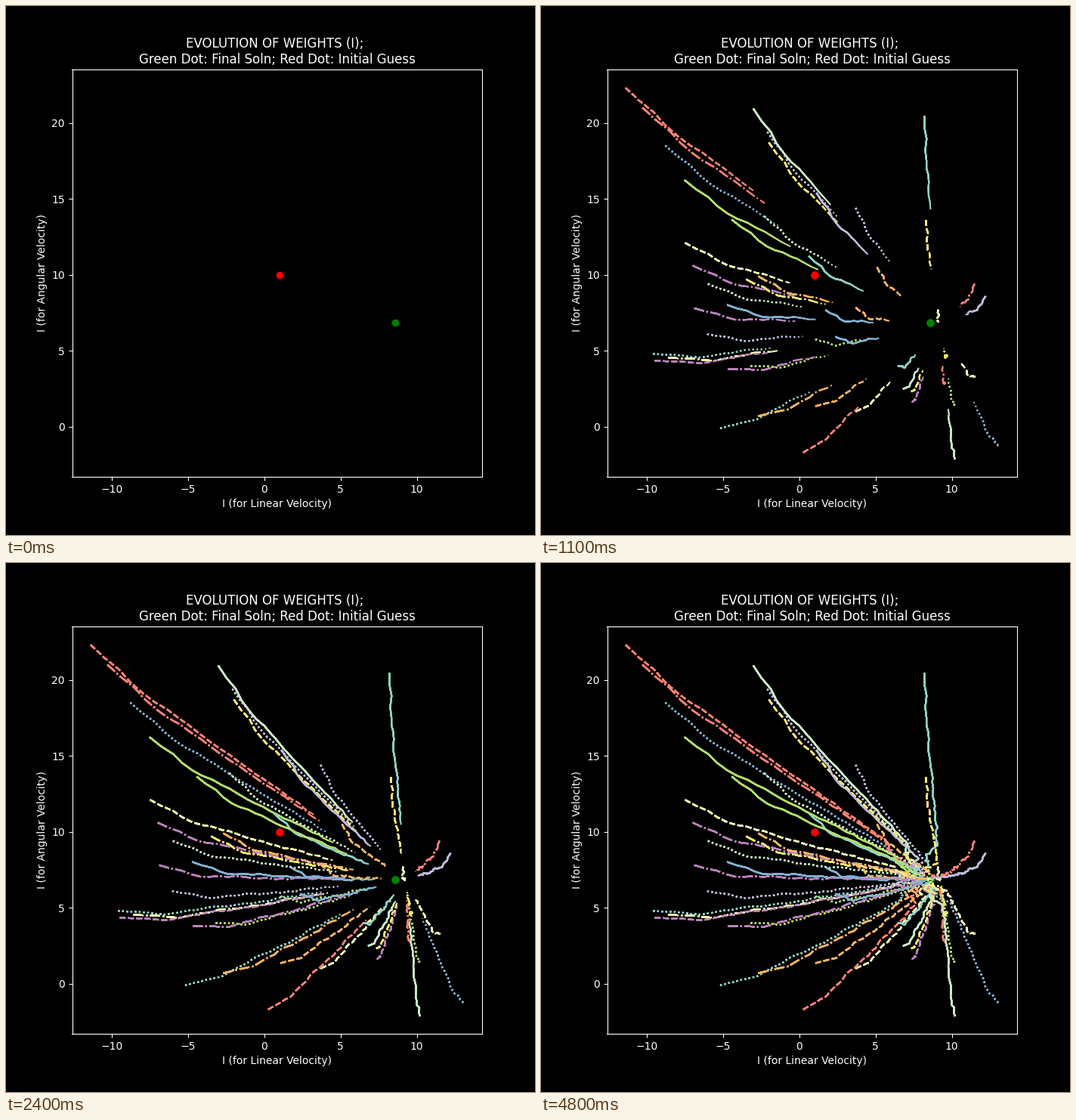
Recreate the animation shown at these times as a matplotlib script. Size 700x700 px, loop 4900 ms.

```python
import numpy as np
import matplotlib.pyplot as plt
from matplotlib.animation import FuncAnimation

FRAMES = 49
LAYERS = 10          # each step is drawn over the previous ones
GOAL = np.array([8.59, 6.84])
GUESS = np.array([1, 10])
STYLES = ("-", "--", ":", "-.")

# Initial weights, one row per round of the ten-colour cycle
STARTS = np.reshape([
    8.2, 20.4, -7.5, 12.1, -2.1, 19.4, -10.3, 21, -4.7, 8,
    5.1, 10.5, -3.2, 4, -7, 10.6, -3, 20.9, -2, 18.7,
    -9.6, 4.8, -8.6, 4.55, 1.15, 15.35, -11.4, 22.3, -8.8, 18.5,
    -2.7, 9.9, -7.5, 16.2, -9.5, 4.35, -2.3, 13.85, -3.5, 9.7,
    0.65, 11.2, 3.7, 1, 3.7, 14.4, 9.55, 2.8, 1.75, 7.65,
    3.7, 7.85, 1.05, 5.75, -6.9, 7.8, 6.85, 2.5, 8.3, 13.6,
    -5.2, -0.1, 9.1, 7.7, 12.2, 8.55, 0.25, -1.7, 13.05, -1.25,
    -2.7, 0.7, -4.4, 13.6, 7.4, 1.6, -6, 9.4, 9.7, 4.75,
    6.5, 4, 11.55, 3.3, -6.05, 6.1, 11.5, 9.4, 2.4, 5.9,
    1.05, 1.35, 10.2, 1.4, -4.7, 3.8, 10.2, -2.1, 7.35, 2.3,
], (-1, 2))

# All runs shrink towards the goal and share one wandering bias
steps = np.arange(FRAMES)
shrink = np.exp(-0.045 * steps - 0.0003 * steps**2)
knots = (0, 4, 8, 15, 24, 32, 37, 48)
bias = np.column_stack([
    np.interp(steps, knots, (0, 0.1, 0.2, 0.35, 0.5, 0.5, -0.2, 0)),
    np.interp(steps, knots, (0, -0.6, -0.5, -0.35, -0.2, -0.1, -0.1, 0)),
])
bias[1:] += np.random.default_rng(4).normal(0, 0.04, (FRAMES - 1, 2))
paths = [GOAL + np.outer(shrink, start - GOAL) + bias for start in STARTS]

plt.style.use("dark_background")
fig, ax = plt.subplots(figsize=(7, 7), dpi=100)
ax.set(xlim=(-12.62, 14.29), ylim=(-3.30, 23.51),
       xlabel="I (for Linear Velocity)", ylabel="I (for Angular Velocity)")
ax.set_title("EVOLUTION OF WEIGHTS (I); \n"
             "Green Dot: Final Soln; Red Dot: Initial Guess")

layers = []
for lag in reversed(range(LAYERS)):
    dots = [ax.plot(*GUESS, "ro")[0], ax.plot(*GOAL, "go")[0]]
    lines = [ax.plot([], [], color=f"C{i % 10}", ls=STYLES[i % 4])[0]
             for i in range(len(paths))]
    layers.append((lag, dots, lines))


def update(n):
    for lag, dots, lines in layers:
        step = n - lag
        for dot in dots:
            dot.set_visible(step >= 0)
        for line, path in zip(lines, paths):
            line.set_visible(step > 0)
            line.set_data(path[:max(step, 0) + 1].T)
    return []


anim = FuncAnimation(fig, update, frames=FRAMES, interval=100, repeat=True,
                     repeat_delay=0, init_func=lambda: update(0))
plt.show()
```
